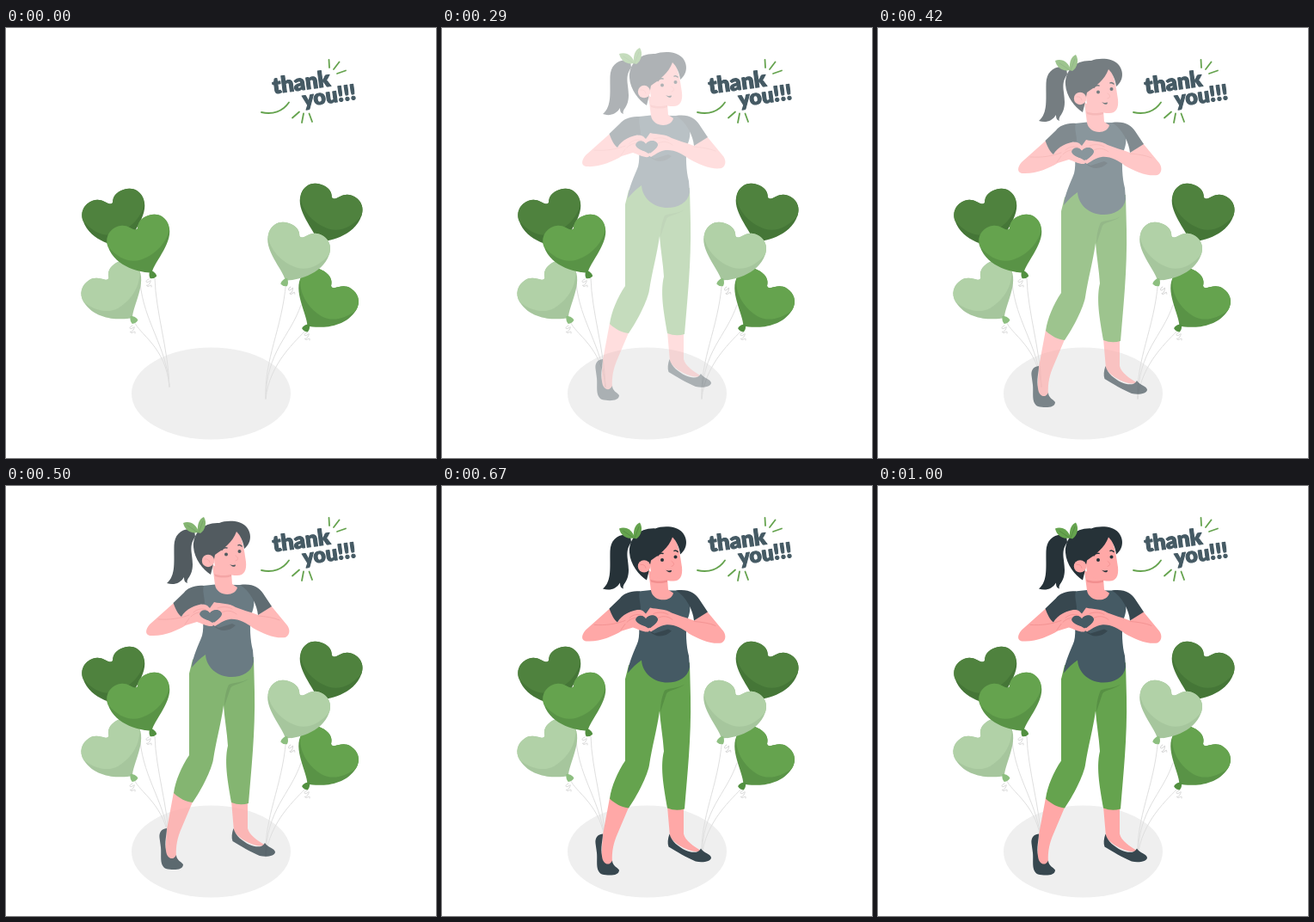
Write an HTML page that moves like this. It is 500 px wide and 500 px high and loops after 1040 ms.

```html
<!DOCTYPE html>
<html lang="en">
<head>
<meta charset="utf-8">
<title>Thank you</title>
<style>
  html, body { margin: 0; width: 100%; height: 100%; overflow: hidden; background: #fff; }
  svg { display: block; width: 100%; height: 100%; }
  text { font: 900 24.5px Lato, "Open Sans", sans-serif; fill: #455a64; stroke: #455a64; stroke-width: 1.1; stroke-linejoin: round; }
  .line { fill: none; stroke-linecap: round; stroke-linejoin: round; }
</style>
</head>
<body>
<svg viewBox="0 0 500 500">
  <defs>
    <path id="heart" d="M0 0C-11 -4 -39 -20 -39 -47C-39 -59 -30 -66 -20 -66C-11 -66 -7 -60 -3 -56Q0 -54 2 -56C4 -62 9 -66 19 -66C30 -66 38 -59 38 -47C38 -26 8 -12 0 0Z"/>
    <path id="shine" d="M-39 -47C-39 -59 -30 -66 -20 -66C-11 -66 -7 -60 -3 -56Q0 -54 2 -56C4 -62 9 -66 19 -66C30 -66 38 -59 38 -47L37 -42C28 -26 8 -18 -8 -19C-22 -20 -33 -31 -39 -47Z"/>
    <path id="knot" d="M-1 -3C2 -2 5 3 4 6Q0 8 -4 6C-5 3 -3 -1 -1 -3Z"/>
    <path id="curl" class="line" stroke="#d8d8d8" d="M0 0C-5 2 -3 5 0 3S3 1 1 5S-4 6 -2 8S4 4 3 9"/>
  </defs>

  <ellipse cx="238.5" cy="425" rx="92.5" ry="53.5" fill="#efefef"/>

  <g class="line" stroke="#dfdfdf">
    <path d="M173 291C174 330 189 375 190 417M156 296C160 342 187 370 190 417M149 341C154 356 186 370 190 417"/>
    <path d="M325.500 297C321 350 300 385 302 431M343 322C330 360 303 375 302 431M350 350C338 363 306 390 302 431"/>
  </g>
  <use href="#curl" x="166" y="292"/>
  <use href="#curl" x="147" y="346"/>
  <use href="#curl" transform="translate(331 301) rotate(-12)"/>
  <use href="#curl" x="350" y="354"/>
  <g id="balloons"></g>

  <text transform="translate(311 76.500) rotate(-7.500)" style="font-size: 26px">thank</text>
  <text transform="translate(346 91.500) rotate(-8)">you!!!</text>
  <path class="line" stroke="#65a34e" stroke-width="1.800" d="M376 46L375.500 37M381 48L387.500 39.500M385 53L395 49.500M341 97.500L333 104.500M346 99.500L344 110M352.500 99.500L356 109M297 98C310 101 322 97 329 86.500"/>

  <g id="woman">
    <g fill="#ffa8a7">
      <path d="M195 362L187 405L185 433C187 442 196 442 198 437C197 424 200 413 204 404L218 371Z"/>
      <path d="M262 372L265 407C271 417 290 427 302 424C292 418 283 412 281 404L281 373Z"/>
    </g>
    <g fill="#37474f">
      <path d="M187 404C180 405 178 409 178.500 415L180 426C181 436 178 447 186 451C194 453 206 453 206 446C204 443 198 441 198 435C195 442 187 440 186 430C184 420 187 411 187 404Z"/>
      <path d="M264.500 404C262.500 410 262 415 263.500 419C272 424 285 432 295 436C303 438 313 436 313 431.500C312 427 305 427 301 421C298 427 290 426 283 423C275 419 267 413 264.500 404Z"/>
    </g>
    <path fill="#65a34e" d="M217 208L213 224L213 319C204 332 197 349 195 363C201 369 209 373 217 374C227 360 239 336 241 324C244 304 250 282 253 261C254 276 257 292 258 308C253 328 259 355 262 374Q272 378 282 375C285 337 290 292 289 245L288 205L232 195Z"/>
    <path fill="#579044" d="M282 230C276 236 264 236 261 241L254 262C254 250 257 241 259 237C266 234 275 235 282 230Z"/>
    <path fill="#455a64" d="M229 122L243 120.500L269 121L277 121C288 128 292 140 285 156C283 168 284 186 287 197L288 210C286 222 275 228 262 228C247 228 233 218 232 202C226 206 221 211 216 217C217 204 224 191 228 180C231 169 228 150 227 140Z"/>
    <path fill="#37474f" d="M241 168C249 177 260 175 267 168L263 166L247 171Z"/>

    <g fill="#ffa8a7">
      <path d="M240 98L243 121C245 134 266 136 269 124L263 120L262 106Z"/>
      <path d="M195 142L167 167C161 174 162 180 169 180C183 181 199 174 209 168L222 164C228 166 235 170 240 169L243 165C238 162 229 162 226 155C229 149 235 150 237 154C240 149 248 149 251 154C249 161 243 163 240 167L243 169C248 166 253 162 260 161C270 160 279 165 287 171C299 178 314 184 325 182C331 179 330 172 327 168L308 145L293 156C283 152 274 150 267 147C260 142 250 143 242 141L237 148L234 145C228 142 216 142 208 151L204 158Z"/>
      <path d="M241 82C251 77 264 69 268 57C275 65 277 80 279 94C280 104 277 110 269 110C260 110 250 108 243 101Z"/>
    </g>
    <path class="line" stroke="#f08f8f" stroke-width=".8" d="M177 161C190 162 203 160 213 156M293 157C303 158 311 159 318 162M218 153C222 149 228 148 233 150M215 158C219 154 223 153 226 153M251 153C257 150 263 151 268 155M246 148C251 146 258 146 263 149M213 160L208 167"/>
    <path fill="#f28f8f" d="M242 108C249 111 256 110 262 109L262 111C256 113 250 113 243 111Z"/>
    <path fill="#455a64" d="M237 154C233 148 226 150 225 155C227 161 235 161 240 165C244 162 250 160 251 155C250 149 241 148 237 154Z"/>
    <g fill="#37474f">
      <path d="M230 122C219 121 211 125 207 130L194.500 142C197 149 200 155 204 158C209 149 220 144 231 143C231 135 228 128 230 122Z"/>
      <path d="M272 121C287 119 294 124 299 131L309 146L293 156C292 144 284 128 272 121Z"/>
    </g>

    <g fill="#263238">
      <path d="M219 57C205 54 196 62 195.500 75C195 93 198 110 187 119C195 122 203 119 207 112C207 116 208 118 211 119C209 113 217 112 217 97C217 84 212 76 220 65Z"/>
      <path d="M238 109C229 103 219 91 218 77C217 60 230 48 248 49C256 46 272 45 280 54C287 63 284 74 277 79C276 71 273 64 268 59C264 71 252 80 243 86L240 101Z"/>
    </g>
    <circle cx="235" cy="93" r="7.200" fill="#ffa8a7"/>
    <path class="line" stroke="#f28f8f" stroke-width=".8" d="M231 91Q236 90 237 95M267 87C270 89 271 92 267 93"/>
    <g fill="#263238">
      <circle cx="256" cy="85.500" r="2"/>
      <circle cx="271.500" cy="82" r="2"/>
      <path d="M260 97C263 98.500 265 98 267 97.500C267 100.500 264 101 260 97Z"/>
    </g>
    <path class="line" stroke="#263238" stroke-width="1.500" d="M251 80.500Q253 77 257 78M270 75Q272 74 274 76"/>
    <path fill="#65a34e" d="M224 60C214 62 208 57 206 49C214 46 222 51 224 60Z"/>
    <path fill="#65a34e" d="M223 60C222 50 225 44 230 42C234 48 232 57 226 61Z"/>
    <path class="line" stroke="#508440" stroke-width=".7" d="M211 52L223 60M229 47L224 60"/>
  </g>
</svg>
<script>
const LOOP = 1040, ENTER = 130, LANDED = 630, STEPS = 13;
const SLIDE = 30, BOB = 1.3, BALLOON_SIZE = 0.97;
const woman = document.getElementById('woman');

const tones = {
  dark: ['#4f823e', '#457637', '#457637'],
  mid: ['#65a34e', '#599346', '#529040'],
  light: ['#b1d1a7', '#a6c69d', '#8dbf80']
};

// Tip position, tilt and mirror of each balloon, back to front.
const balloons = [
  ['dark', 140.5, 254.5, -19.5, 1], ['light', 147, 337, -32.5, 1], ['mid', 169.5, 284.5, -19.5, 1],
  ['dark', 362.5, 248.5, -19.5, -1], ['mid', 350.5, 346.5, -32.5, -1], ['light', 325, 293.5, -19.5, -1]
];

document.getElementById('balloons').innerHTML = balloons.map(([tone, x, y, tilt, flip]) => {
  const [main, shade, knot] = tones[tone];
  const tail = tone === 'dark' ? '' : `<use href="#knot" fill="${knot}"/>`;
  return `<g transform="translate(${x} ${y}) scale(${flip * BALLOON_SIZE} ${BALLOON_SIZE}) rotate(${tilt})">
    <use href="#heart" fill="${shade}"/><use href="#shine" fill="${main}"/>${tail}</g>`;
}).join('');

function entrance(t) {
  if (t < ENTER) return 0;
  const step = Math.floor((t - ENTER) / (LANDED - ENTER) * (STEPS - 1) + 0.15) + 1;
  const u = Math.min(1, step / STEPS);
  return 0.7 * u + 0.3 * u * u * (3 - 2 * u);
}

function draw(t) {
  const p = entrance(t);
  const bob = t > LANDED ? BOB * Math.sin(Math.PI * (t - LANDED) / (LOOP - LANDED)) : 0;
  woman.setAttribute('opacity', p);
  woman.setAttribute('transform', `translate(0 ${bob - SLIDE * (1 - p)})`);
}

const start = performance.now();
function tick() {
  draw((performance.now() - start) % LOOP);
  requestAnimationFrame(tick);
}
tick();
</script>
</body>
</html>
```
